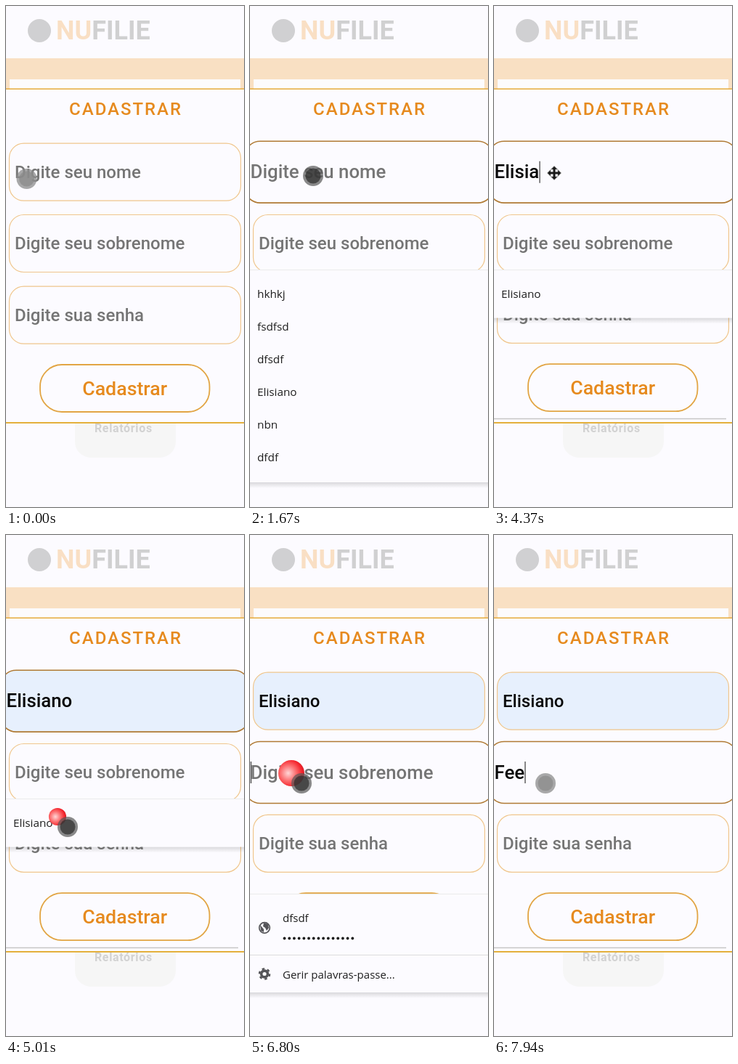
These frames come from a looping animation (328 by 690 pixels, 8 s). An HTML page:

```html
<!DOCTYPE html>
<html lang="pt">
<head>
<meta charset="utf-8">
<style>
  html, body { margin: 0; width: 100%; height: 100%; overflow: hidden; background: #fcfbff; }
  svg { display: block; width: 328px; height: 690px; overflow: hidden; }
  text { white-space: pre; font-family: Roboto, sans-serif; font-weight: 500; }
  .list text { font: 500 15.3px "Open Sans", "Noto Sans", sans-serif; fill: #1e1e1e; }
  .list .thin { font-weight: 400; font-size: 15px; }
  .input { font-size: 24px; }
</style>
</head>
<body>
<svg id="stage" viewBox="0 0 328 690">
  <defs>
    <radialGradient id="click" cx=".38" cy=".5" r=".62">
      <stop offset="0" stop-color="#ffd6d6"/>
      <stop offset=".5" stop-color="#fc6a6c"/>
      <stop offset=".85" stop-color="#f4242c"/>
      <stop offset="1" stop-color="#d82028"/>
    </radialGradient>
    <linearGradient id="shade" x2="0" y2="1">
      <stop offset="0" stop-color="#505050" stop-opacity=".2"/>
      <stop offset="1" stop-color="#505050" stop-opacity="0"/>
    </linearGradient>
  </defs>

  <rect width="328" height="690" fill="#fcfbff"/>
  <circle cx="46" cy="34" r="16" fill="#d0d0d2"/>
  <text x="69" y="46" font-size="36" style="font-weight:700"><tspan fill="#f9dfc4">NU</tspan><tspan fill="#d0d0d1">FILIE</tspan></text>
  <rect y="72" width="328" height="42" fill="#f9e0c3"/>
  <rect x="5" y="101" width="318" height="13" fill="#fcfbfd"/>

  <rect x="95" y="550" width="139" height="72" rx="22" fill="#f6f6f6"/>
  <text x="122" y="587" font-size="16" letter-spacing=".65" style="font-weight:700" fill="#d2d2d2">Relatórios</text>

  <rect y="114" width="328" height="460" fill="#fcfbff"/>
  <path d="M0 114.3H328" stroke="#e6ac3c" stroke-width="1.6"/>
  <path d="M0 574H328" stroke="#e4b03c" stroke-width="1.8"/>
  <path id="scrollbar" d="M0 568.5H320" stroke="#c6c6c6" stroke-width="1.5"/>
  <text x="87" y="150" font-size="24" letter-spacing="2" fill="#e68a1e">CADASTRAR</text>

  <g id="fields"></g>
  <g id="button">
    <rect x="47" y="494" width="233.5" height="65" rx="30" fill="#fcfbff" stroke="#e2a544" stroke-width="1.8"/>
    <text x="163.7" y="536" font-size="26.7" text-anchor="middle" fill="#e68a1e">Cadastrar</text>
  </g>

  <g id="names" class="list"></g>
  <g id="passwords" class="list"></g>

  <circle id="red" fill="url(#click)"/>
  <g id="pointer">
    <circle r="14" id="rim"/>
    <circle r="10.5" id="core"/>
  </g>
  <path id="move" transform="translate(83 230)" fill="#181818" stroke="#909090" stroke-width=".7"
    d="M0-9.5L4.5-5H1.6V-1.6H5V-4.5L9.5 0L5 4.5V1.6H1.6V5H4.5L0 9.5L-4.5 5H-1.6V1.6H-5V4.5L-9.5 0L-5-4.5V-1.6H-1.6V-5H-4.5Z"/>
</svg>
<script>
const LOOP = 8000, CENTER = 164, GROW = 0.075;
const NAME = 'Elisiano';
const $ = id => document.getElementById(id);

function add(parent, tag, attrs = {}, text = '') {
  const node = document.createElementNS('http://www.w3.org/2000/svg', tag);
  set(node, attrs);
  node.textContent = text;
  return parent.appendChild(node);
}
function set(node, attrs) {
  for (const key in attrs) node.setAttribute(key, attrs[key]);
}
const show = (node, on) => node.style.display = on ? '' : 'none';
const clamp = v => Math.max(0, Math.min(1, v));
const ease = v => v * v * (3 - 2 * v);
const ramp = (t, start, span) => ease(clamp((t - start) / span));
const within = (t, a, b) => t >= a && t < b;

// Last value whose start time has passed.
const latest = (t, steps) => steps.reduce((v, [at, next]) => t >= at ? next : v, '');

// Eased position along [time, x, y] stops.
function along(t, stops) {
  let i = 0;
  while (i < stops.length - 2 && t >= stops[i + 1][0]) i++;
  const [a, b] = [stops[i], stops[i + 1]];
  const k = ramp(t, a[0], b[0] - a[0]);
  return [1, 2].map(n => a[n] + (b[n] - a[n]) * k);
}

function makeField(cy, hint) {
  const group = add($('fields'), 'g');
  const box = add(group, 'rect', { x: 4.5, y: cy - 39.5, width: 319, height: 79, rx: 20 });
  const label = add(group, 'text', { x: 12, y: cy + 8, class: 'input' });
  const caret = add(group, 'path', { stroke: '#222', 'stroke-width': 1 });
  return { group, box, label, caret, cy, hint };
}
const fields = [
  makeField(228.7, 'Digite seu nome'),
  makeField(327, 'Digite seu sobrenome'),
  makeField(425.7, 'Digite sua senha')
];

function drawField(f, { focus = 0, active = false, value = '', filled = false, caret = false, shift = 0 }) {
  const s = 1 + GROW * focus;
  set(f.group, { transform: `translate(${CENTER} ${f.cy + shift}) scale(${s}) translate(${-CENTER} ${-f.cy})` });
  set(f.box, {
    fill: filled ? '#e7f0fd' : '#fcfbff',
    stroke: active ? '#b07a34' : '#f0c68c',
    'stroke-width': active ? 1.5 : 1.2
  });
  f.label.textContent = value || f.hint;
  set(f.label, { fill: value ? '#080808' : '#757575' });
  show(f.caret, caret);
  if (caret) {
    const x = 12.7 + (value ? f.label.getComputedTextLength() : 0);
    set(f.caret, { d: `M${x} ${f.cy - 14}v28` });
  }
}

function makePanel(group, y) {
  const shade = add(group, 'rect', { width: 328, height: 8, fill: 'url(#shade)' });
  const back = add(group, 'rect', { y, width: 328, fill: '#fcfbff' });
  add(group, 'path', { d: `M0 ${y}H328`, stroke: '#ebebeb', 'stroke-width': 1 });
  return bottom => {
    set(shade, { y: bottom });
    set(back, { height: bottom - y });
  };
}

const sizeNames = makePanel($('names'), 363.5);
const rows = ['hkhkj', 'fsdfsd', 'dfsdf', NAME, 'nbn', 'dfdf'].map((word, i) =>
  add($('names'), 'text', { x: 10, y: 402 + 45 * i }, word));
const match = add($('names'), 'text', { x: 10, y: 402 }, NAME);

const pass = $('passwords');
makePanel(pass, 494.5)(630);
add(pass, 'text', { x: 45, y: 533, class: 'thin' }, 'dfsdf');
for (let i = 0; i < 15; i++) add(pass, 'circle', { cx: 47.5 + 6.7 * i, cy: 555.5, r: 1.9, fill: '#1c1c1c' });
add(pass, 'path', { d: 'M0 578.5H328', stroke: '#dcdcdc' });
add(pass, 'text', { x: 45, y: 611, class: 'thin' }, 'Gerir palavras-passe...');
add(pass, 'circle', { cx: 20, cy: 541, r: 7.3, fill: '#fcfbff', stroke: '#545458', 'stroke-width': 1.7 });
add(pass, 'path', { d: 'M14 537l5 6v4l-4-2zM19 534l6 2 1 5-3 4-2-4-3-2z', fill: '#545458' });
add(pass, 'circle', { cx: 20, cy: 604.5, r: 4.4, fill: 'none', stroke: '#545458', 'stroke-width': 3.6 });
add(pass, 'circle', { cx: 20, cy: 604.5, r: 7.1, fill: 'none', stroke: '#545458', 'stroke-width': 2.4,
  'stroke-dasharray': '3.6 3.83' });

const path = [
  [80, 28.5, 238], [280, 110, 330], [480, 165, 500], [650, 110, 350], [850, 87, 234],
  [4380, 87, 234], [4800, 85, 402], [5860, 85, 402], [6400, 71, 342], [8000, 71, 342]
];
const nameTyping = [
  [2750, 1], [2960, 2], [3340, 3], [3690, 4], [3850, 5], [4010, 6], [4800, 8]
].map(([at, n]) => [at, NAME.slice(0, n)]).concat([[5560, NAME + ' ']]);
const surnameTyping = [[7480, 'F'], [7700, 'Fe'], [7880, 'Fee']];
const clicks = [[1060, 1560], [4960, 5380], [6560, 7100]];

function draw(t) {
  const first = within(t, 1160, 6600), second = t >= 6600;
  const shift = t >= 1160 ? -0.8 : 0;
  const blink = start => (t - start) % 1000 < 500;
  drawField(fields[0], {
    focus: ramp(t, 1160, 200) - ramp(t, 6580, 160),
    active: first,
    value: latest(t, nameTyping).slice(0, second ? 8 : 9),
    filled: t >= 4800,
    caret: first && (t < 2750 ? blink(1160) : t < 4800 || (t >= 5050 && blink(5560)))
  });
  drawField(fields[1], {
    focus: ramp(t, 6580, 160),
    active: second,
    value: latest(t, surnameTyping),
    caret: second && (t >= 7480 || blink(6600))
  });
  drawField(fields[2], { shift });

  show($('scrollbar'), shift);
  set($('button'), { transform: `translate(0 ${shift})` });

  const filtered = t >= 2750;
  show($('names'), within(t, 1440, 5050));
  sizeNames(filtered ? 429.5 : 656);
  rows.forEach(row => show(row, !filtered));
  show(match, filtered);
  show(pass, within(t, 6700, 7480));

  const [x, y] = along(t, path);
  const moving = within(t, 3690, 4400);
  const light = t < 200 || t >= 7300;
  show($('move'), moving);
  show($('pointer'), !moving);
  set($('pointer'), { transform: `translate(${x} ${y})` });
  set($('rim'), { fill: light ? '#8c8c8c' : '#585858', opacity: light ? .75 : .7 });
  set($('core'), { fill: light ? '#8a8a8a' : '#2c2c2c', opacity: .7 });

  const click = clicks.find(([a, b]) => within(t, a, b));
  show($('red'), click);
  if (click) {
    const [a, b] = click;
    set($('red'), {
      cx: x - 14, cy: y - 14,
      r: 18 * ramp(t, a - 60, 180),
      opacity: 1 - ramp(t, b - 180, 180)
    });
  }
}

const begin = performance.now();
function tick() {
  draw((performance.now() - begin) % LOOP);
  requestAnimationFrame(tick);
}
tick();
</script>
</body>
</html>
```
